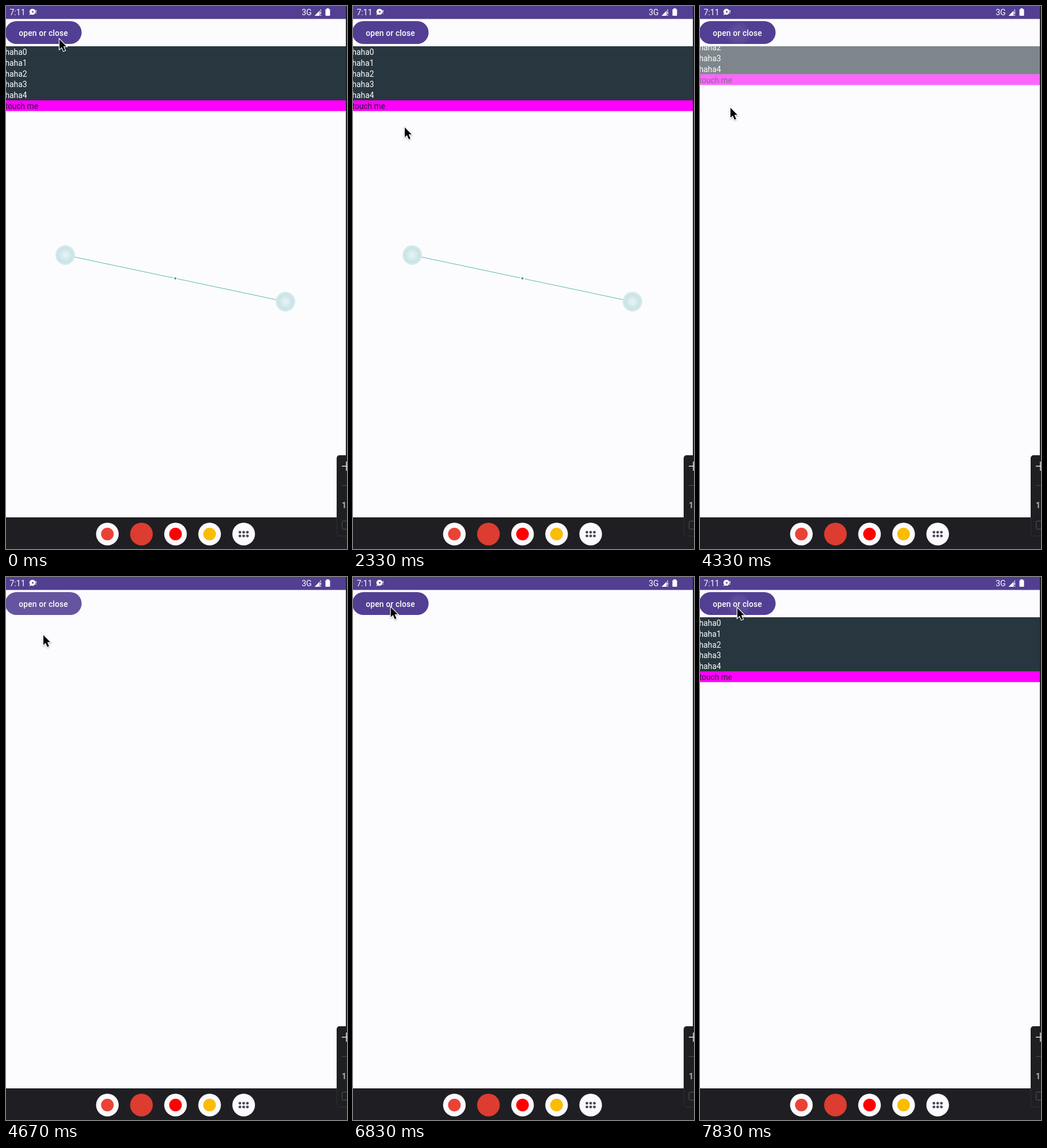
An HTML page for the animation above (8000 ms loop, 593x944 px).

```html
<!DOCTYPE html>
<html lang="en">
<head>
<meta charset="utf-8">
<title>Open or close</title>
<style>
  html, body { margin: 0; width: 100%; height: 100%; overflow: hidden; background: #fcfcff; }
  svg { display: block; }
  text { font: 13.8px Roboto, sans-serif; fill: #fff; }
  .status { font-size: 14px; }
  .label { font-weight: 500; letter-spacing: .17px; text-anchor: middle; }
  #cursor { paint-order: stroke; filter: drop-shadow(.5px 1px 1px #0005); }
</style>
</head>
<body>
<svg width="593" height="944" viewBox="0 0 593 944">
  <defs>
    <radialGradient id="touchFill">
      <stop offset="0" stop-color="#e8f4f7"/>
      <stop offset=".8" stop-color="#c8e2e4"/>
      <stop offset=".84" stop-color="#d6e9ea"/>
      <stop offset="1" stop-color="#d3e8e9"/>
    </radialGradient>
    <radialGradient id="rippleFill">
      <stop offset=".6" stop-color="#fff"/>
      <stop offset="1" stop-color="#fff" stop-opacity="0"/>
    </radialGradient>
    <clipPath id="buttonShape"><rect id="pill" x="-1.5" y="26.3" width="133" height="39.7" rx="19.85"/></clipPath>
  </defs>

  <!-- status bar -->
  <rect width="593" height="22.5" fill="#523f92"/>
  <text class="status" x="6.5" y="16">7:11</text>
  <text class="status" x="514.2" y="16">3G</text>
  <g fill="#fff">
    <path d="M40 16l3-4 2 2zM51.7 7h1.2v4h-1.2zM51.7 12h1.2v1.3h-1.2z"/>
    <circle cx="46" cy="10" r="5.3"/>
    <path d="M536.5 17L548 5.5V8h-2.5v9zM546.5 9.5h1.6v4.5h-1.6zM546.5 15.4h1.6V17h-1.6z"/>
    <path d="M557.5 4h4v1.5h1q1 0 1 1V16q0 1-1 1h-6q-1 0-1-1V6.5q0-1 1-1h1z"/>
  </g>
  <circle cx="46.5" cy="10" r="1.5" fill="#523f92"/>

  <!-- button -->
  <g clip-path="url(#buttonShape)">
    <rect x="-2" y="26" width="134" height="41" fill="#523f93"/>
    <circle id="ripple" cx="67" cy="49" fill="url(#rippleFill)"/>
  </g>
  <text class="label" x="65.1" y="52">open or close</text>

  <!-- collapsible panel -->
  <svg id="panel" y="70" width="591" overflow="hidden">
    <g id="content">
      <rect width="591" height="94" fill="#28373f"/>
      <rect y="94" width="591" height="18.7" fill="#f0f"/>
      <g id="rows"></g>
      <text x="-1.5" y="109" style="fill:#2b1430">touch me</text>
    </g>
  </svg>

  <!-- two-finger guide -->
  <g id="pinch">
    <path d="M103 433L486 514" stroke="#5bb5a8"/>
    <circle cx="103" cy="433" r="17" fill="url(#touchFill)"/>
    <circle cx="486" cy="514" r="17" fill="url(#touchFill)"/>
    <circle cx="294.5" cy="473.5" r="4" fill="#fcfcff"/>
    <circle cx="294.5" cy="473.5" r="2" fill="#45a0ae"/>
  </g>

  <!-- dock -->
  <rect y="889" width="593" height="55" fill="#1f1f23"/>
  <rect x="591" width="2" height="944" fill="#1f1f23"/>
  <g id="dock"></g>
  <g id="dots" fill="#4a4658"></g>

  <!-- side toolbar -->
  <rect x="575" y="781" width="30" height="140.5" rx="5" fill="#1e1f22"/>
  <path d="M575.5 889V916.500Q575.500 921.500 580.500 921.500H593" fill="none" stroke="#303135"/>
  <path d="M584 800h9M592 792v16" stroke="#e4e4e6" stroke-width="1.5"/>
  <path d="M584 833.5h9" stroke="#4c4d51"/>
  <text x="584" y="873" style="font-weight:700;fill:#b4b5b9">1:1</text>
  <rect x="584.5" y="895.5" width="15" height="14" rx="2" fill="none" stroke="#55565a"/>

  <path id="cursor" d="M0 0V17L3.9 13.4 7 20.5 9.8 19.3 6.8 12.2H12Z" stroke="#fff" stroke-width="2.4"/>
</svg>
<script>
const LOOP = 8000, FPS = 12, PANEL_HEIGHT = 113;
const PINCH_END = 46, CLOSE = 52, OPEN = 84, LAST_PRESS = 94; // in ticks
const $ = id => document.getElementById(id);
const clamp = v => Math.max(0, Math.min(1, v));
const repeat = (count, make) => Array.from({ length: count }, (_, i) => make(i)).join('');
const disc = (x, y, r, fill) => `<circle cx="${x}" cy="${y}" r="${r}"${fill ? ` fill="${fill}"` : ''}/>`;

$('rows').innerHTML = repeat(5, i => `<text x="-1.5" y="${15 + i * 18.75}">haha${i}</text>`);
$('dock').innerHTML = repeat(5, i => disc(176.3 + i * 59.25, 918, 19.7, i === 1 ? '#dd3c30' : '#fcfaff'))
  + disc(176.3, 918, 11, '#ea4335') + disc(294.8, 918, 11, '#f00') + disc(354, 918, 11, '#fbbc04');
$('dots').innerHTML = repeat(6, i => disc(406.8 + i % 3 * 6.5, i < 3 ? 914.8 : 921.3, 2.4));

// Cursor strokes: tick at rest, tick of arrival, destination x, y
const strokes = [
  [0, 2, 95, 48], [11, 16, 112, 218], [17, 19, 100, 188], [20, 22, 90, 211],
  [28, 33, 54, 54], [35, 38, 61, 50], [47, 50, 50, 196], [51, 56, 65, 101],
  [57, 61, 64, 60], [67, 70, 66, 52], [81, 84, 65, 54]
];

function cursorAt(tick) {
  let x = 93, y = 58;
  for (const [from, to, toX, toY] of strokes) {
    const p = clamp((tick - from) / (to - from));
    x += (toX - x) * p;
    y += (toY - y) * p;
  }
  return [x, y];
}

// A press grows a circle over the button, then fades within 8 ticks
function drawRipple(tick) {
  const press = [LAST_PRESS, OPEN, CLOSE].find(start => start <= tick) ?? -Infinity;
  const age = Math.min(tick - press, 9);
  $('ripple').setAttribute('r', 22 + age * 70);
  $('ripple').setAttribute('opacity', .2 * clamp((age + 1) / 3) * clamp(1 - age / 9));
}

function drawPanel(tick) {
  const shown = clamp(1 - (tick - CLOSE + 1) / 2.5) + clamp((tick - OPEN + 1) / 2.5);
  const height = PANEL_HEIGHT * shown;
  $('panel').setAttribute('height', height);
  $('content').setAttribute('transform', `translate(0 ${height - PANEL_HEIGHT})`);
  $('content').setAttribute('opacity', shown);
}

function draw(now) {
  const tick = Math.floor((now % LOOP + 4) * FPS / 1000) % (LOOP * FPS / 1000);
  drawPanel(tick);
  drawRipple(tick);
  $('pinch').setAttribute('visibility', tick < PINCH_END ? 'visible' : 'hidden');
  $('cursor').setAttribute('transform', `translate(${cursorAt(tick)})`);
  requestAnimationFrame(draw);
}
draw(performance.now());
</script>
</body>
</html>
```
